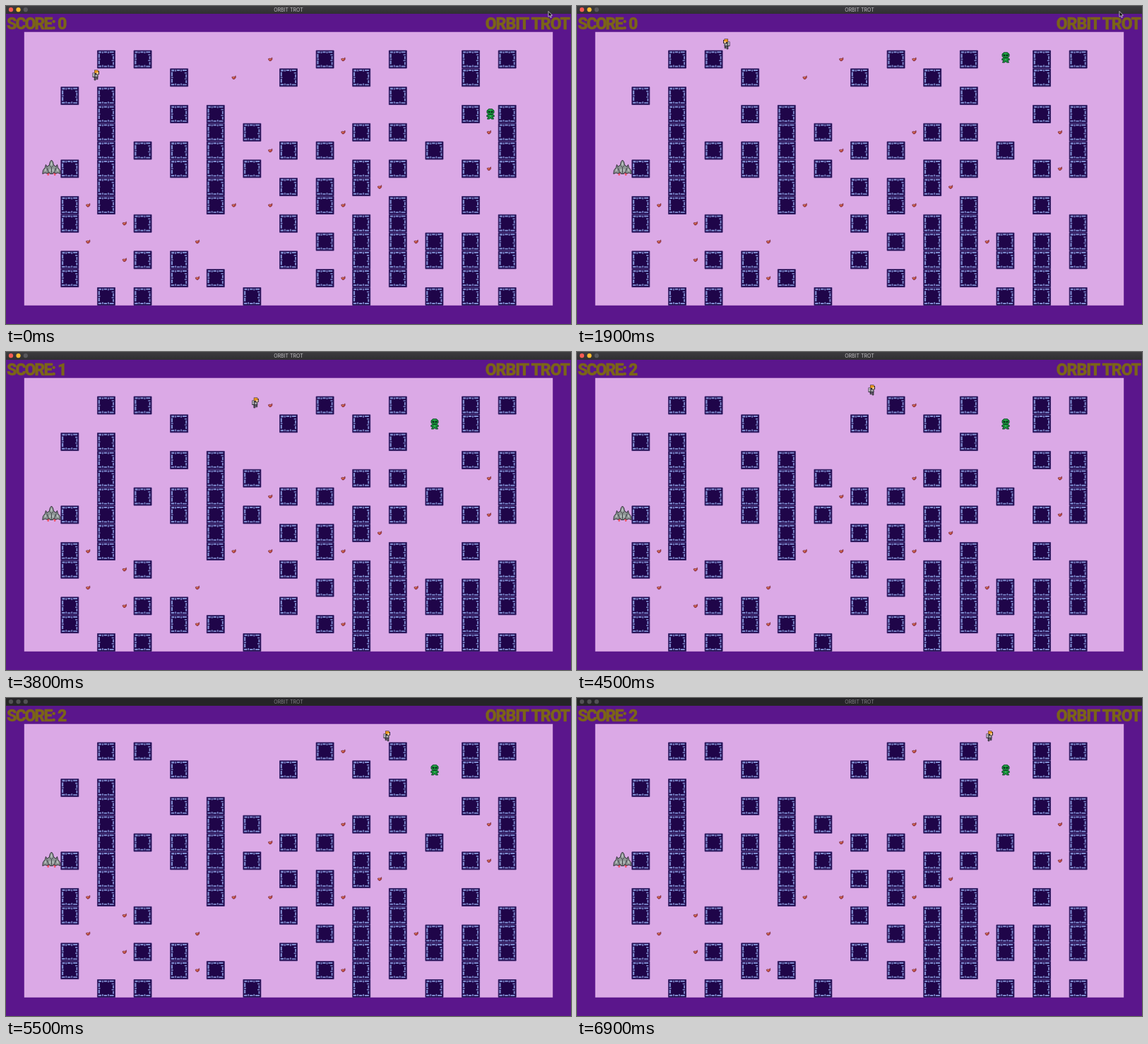
Animation of 800 by 450 pixels, one loop 7 s. Source, as an HTML page:

```html
<!DOCTYPE html>
<html lang="en">
<head>
<meta charset="utf-8">
<title>ORBIT TROT</title>
<style>
  html, body { margin: 0; width: 100%; height: 100%; overflow: hidden; background: #5b168c; }
  svg { display: block; width: 800px; height: 450px; }
  .title { font: 7px Inter, Roboto, sans-serif; fill: #c6c5c7; text-anchor: middle; }
  .hud { font: 900 23px Roboto, "Liberation Sans", sans-serif; fill: #7b6418; stroke: #7b6418; stroke-width: .3; }
  .idle .bar { fill: #252427; }
  .idle .title { fill: #858487; }
  .idle .light { fill: #525154; }
</style>
</head>
<body>
<svg id="stage" viewBox="0 0 800 450">
  <defs>
    <linearGradient id="barFill" x2="0" y2="1">
      <stop stop-color="#3d3c3f"/><stop offset="1" stop-color="#302f32"/>
    </linearGradient>

    <g id="block" transform="translate(-12.9 -12.9)">
      <path fill="#1f0549" stroke="#2f2267" stroke-width=".8" d="M.4 .4H25.4V25.4H.4Z"/>
      <path fill="#7f8dd0" d="M2 1.6H6V4H2Z M7 1.6H8.6V4.4H7Z M9.6 1.6H14V3.6H9.6Z M15 1.6H16.6V4.4H15Z M17.6 1.6H23.6V3.6H17.6Z
        M1.6 5.2H3.8V11H1.6Z M1.6 12H4.4V13.6H1.6Z M1.6 14.6H3.8V20H1.6Z M1.6 21.6H6V23.8H1.6Z
        M20.6 5.6H23.8V7.2H20.6Z M22 8.4H23.8V13H22Z M20.6 14H23.8V15.4H20.6Z M22 16.6H23.8V20.6H22Z
        M7 21H8.6V23.8H7Z M9.6 22H14V23.8H9.6Z M15 21H16.6V23.8H15Z M17.6 22H23.6V23.8H17.6Z"/>
    </g>

    <g id="pod">
      <path fill="#b8423c" stroke="#6d2a3a" stroke-width=".6" d="M-2.8 -.8L-.6 -1.4L.8 -1L2.6 -2.6L2.8 0L1.2 2L-.8 2.4L-2.2 1Z"/>
      <path fill="#e39a70" d="M-1.9 -.6L.2 -.7L.6 .2L-.8 .5Z"/>
    </g>

    <g id="ship">
      <path fill="#ef5468" d="M-7 6H-2.5L-4 10.5H-5.5Z M2.5 6H7L5.5 10.5H4Z"/>
      <path fill="#8d9594" stroke="#2c2d33" stroke-width="1" d="M0 -11.5L2 -9L3 -4.5L6.5 -2L8 -5L9 -1L12 3L12.6 8L9 6.5L6.5 7.5L3 6L2 8H-2L-3 6L-6.5 7.5L-9 6.5L-12.6 8L-12 3L-9 -1L-8 -5L-6.5 -2L-3 -4.5L-2 -9Z"/>
      <path fill="none" stroke="#3d4046" stroke-width=".9" d="M-3 -4L0 -1L3 -4M0 -1V7M-7 -1L-4 6M7 -1L4 6M-10 4L-5 1M10 4L5 1"/>
      <path fill="#bcc4c2" d="M-1 -8H1V-4H-1Z M-9.5 2L-7 .5V3L-10 5Z M9.5 2L7 .5V3L10 5Z M-3 1H-1.2V5H-3Z M3 1H1.2V5H3Z"/>
    </g>

    <g id="body">
      <path fill="#2a2730" d="M-2 -7.5H3.5V-6H5V-1H3.5V3H-4.5V-3.5H-2Z"/>
      <path fill="#a9a9ae" d="M-4 -3H-1.5V2H-4Z"/>
      <path fill="#e3921f" d="M-1.5 -7H3V-5.5H4V-4H1V-3H-1.5Z"/>
      <path fill="#f0c99b" d="M1 -4H4V-1.5H1Z"/>
      <path fill="#77777e" d="M-.8 -1H2.8V2.5H-.8Z"/>
      <path fill="#d8d8da" d="M0 0H1.5V1.5H0Z"/>
    </g>

    <g id="alien">
      <path fill="#17903a" stroke="#0d4426" stroke-width=".9" d="M-2.5 -7.2H2.5L5 -5V-1.8L2.8 .4L5.2 1.6V3.6H2.8L4.6 7H1.4L0 5L-1.4 7H-4.6L-2.8 3.6H-5.2V1.6L-2.8 .4L-5 -1.8V-5Z"/>
      <path fill="#0b2b1c" d="M-3.8 -4.2H-.7V-2H-2.8Z M3.8 -4.2H.7V-2H2.8Z M-2.4 -.2H2.4V.7H-2.4Z"/>
      <path fill="#35c055" d="M-2 -6.2H1.5V-5.2H-2Z M-1.2 1.8H1.2V3.6H-1.2Z"/>
    </g>
  </defs>

  <path fill="#5b168c" d="M0 0H800V450H0Z"/>
  <path fill="#dba9e6" d="M25.8 36.8H774.2V423.8H25.8Z"/>
  <g id="maze"></g>
  <use href="#ship" x="64.4" y="229.5"/>

  <g id="foe"><use href="#alien"/></g>
  <g id="hero">
    <use href="#body"/>
    <path id="legs" fill="#55555d" stroke="#24222a" stroke-width=".6"/>
  </g>

  <text class="hud" id="score" x="1" y="33.3" letter-spacing="-2"></text>
  <text class="hud" x="798" y="33.3" text-anchor="end" letter-spacing="-1.1">ORBIT TROT</text>

  <g id="chrome">
    <path class="bar" fill="url(#barFill)" d="M0 0H800V11H0Z"/>
    <circle class="light" cx="7" cy="5.2" r="3.1" fill="#fc5b53"/>
    <circle class="light" cx="17.5" cy="5.2" r="3.1" fill="#fcbb2f"/>
    <circle class="light" cx="27.8" cy="5.2" r="3.1" fill="#59585c"/>
    <text class="title" x="400" y="7.8">ORBIT TROT</text>
  </g>
  <path id="cursor" fill="#111" stroke="#eee" stroke-width=".7" d="M768 7.5V15.3L769.8 13.7L771 16.5L772.3 16L771.1 13.3H773.5Z"/>
</svg>

<script>
const LOOP = 7000, STEP = 100, CELL = 800 / 31, TOP = 36.8;
const $ = id => document.getElementById(id);

// One entry per odd column from 3; each hex digit is a row.
const walls = ['379acd', '13456789e', '16ace', '2467cd', '456789d', '57e', '268ac',
  '1689bd', '2578abcde', '13579abcd', '6bce', '12479bcde', '14567abce'];
// One entry per even column from 4.
const pods = ['9b', 'ac', '', 'bd', '29', '169', '', '159d', '8', 'b', '', '57'];

const heroPath = [[0, 127, 98], [900, 227, 98], [1300, 227, 54], [1780, 227, 54],
  [1900, 212, 54], [2350, 212, 54], [2850, 271, 54], [3000, 271, 71], [3250, 298, 98],
  [3500, 322, 98], [3870, 360, 66], [4050, 378, 60], [4220, 383, 54], [4500, 417, 54],
  [5500, 539, 54], [5900, 584, 54], [LOOP, 584, 54]];
const foePath = [[0, 686, 153], [200, 686, 127], [815, 607, 127], [900, 607, 116],
  [1400, 607, 51], [1730, 607, 51], [1900, 607, 73], [2130, 607, 102], [LOOP, 607, 102]];
const pickups = [[3500, 'pod12-2'], [4000, 'pod14-1']];

function place(shape, col, row) {
  const el = document.createElementNS('http://www.w3.org/2000/svg', 'use');
  el.setAttribute('href', '#' + shape);
  el.setAttribute('x', (col + .5) * CELL);
  el.setAttribute('y', TOP + (row + .5) * CELL);
  el.id = `${shape}${col}-${row}`;
  $('maze').append(el);
}

function fill(shape, columns, first) {
  columns.forEach((rows, i) => {
    for (const r of rows) place(shape, first + 2 * i, parseInt(r, 16));
  });
}

function pose(path, t) {
  let i = 0, side = 1;
  while (i < path.length - 2 && t >= path[i + 1][0]) {
    side = Math.sign(path[i + 1][1] - path[i][1]) || side;
    i++;
  }
  const [t0, x0, y0] = path[i], [t1, x1, y1] = path[i + 1];
  const k = (t - t0) / (t1 - t0);
  return {
    x: x0 + (x1 - x0) * k,
    y: y0 + (y1 - y0) * k,
    side: Math.sign(x1 - x0) || side,
    moving: x0 !== x1 || y0 !== y1
  };
}

function draw(time) {
  const t = Math.floor((time % LOOP) / STEP) * STEP;
  const hero = pose(heroPath, t), foe = pose(foePath, t);
  $('hero').setAttribute('transform', `translate(${hero.x} ${hero.y}) scale(${hero.side} 1)`);
  $('foe').setAttribute('transform', `translate(${foe.x} ${foe.y})`);
  const stride = hero.moving && t / STEP % 2 ? 1.2 : 0;
  $('legs').setAttribute('d', `M-2 3H0V${7 - stride}H-2Z M1 3H3V${5.8 + stride}H1Z`);

  let score = 0;
  for (const [at, id] of pickups) {
    const taken = t >= at;
    score += taken;
    $(id).style.display = taken ? 'none' : '';
  }
  $('score').textContent = 'SCORE: ' + score;
  $('cursor').style.display = t < 2500 ? '' : 'none';
  $('chrome').classList.toggle('idle', t >= 4800);
}

fill('block', walls, 3);
fill('pod', pods, 4);

const start = performance.now();
function tick() {
  draw(performance.now() - start);
  requestAnimationFrame(tick);
}
tick();
</script>
</body>
</html>
```
